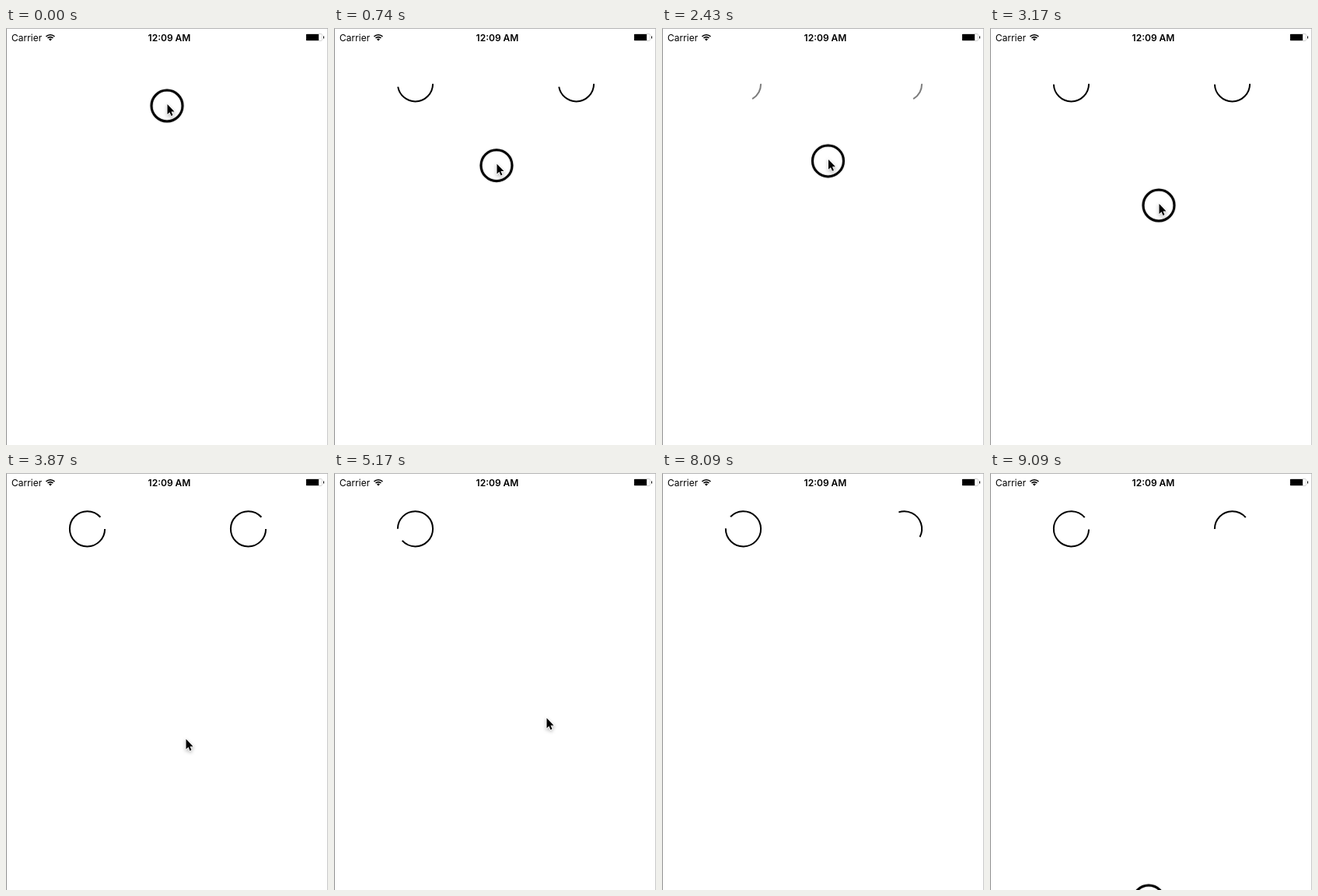
An HTML page with a canvas for the animation above (9140 ms loop, 414 by 536 pixels).

```html
<!DOCTYPE html>
<html lang="en">
<head>
<meta charset="utf-8">
<title>Pull to refresh</title>
<style>
html, body { margin: 0; width: 414px; height: 536px; overflow: hidden; background: #fff; }
body { position: relative; font: 12px/14px Inter, "Liberation Sans", sans-serif; color: #000; }
canvas { position: absolute; left: 0; top: 0; }
span { position: absolute; top: 6px; white-space: nowrap; }
.carrier { left: 7px; }
.clock { left: 109px; width: 202px; text-align: center; font-weight: 600; }
</style>
</head>
<body>
<canvas id="stage" width="414" height="536"></canvas>
<span class="carrier">Carrier</span>
<span class="clock">12:09 AM</span>
<script>
const ctx = document.getElementById('stage').getContext('2d');
const LOOP = 9140;
const RELEASE = 3868;   // second pull lets go, spinning starts
const SPIN = 0.1382;    // degrees per ms
const ARC = 318;        // length of the finished arc, degrees
const HALF = 164;       // where the right arc is split
const CYCLE = 1630;     // both halves of the right arc, ms

const pulls = [
  { down: 0, up: 1190, y: 100 },
  { down: 2060, up: RELEASE, y: 147 }
];

// the pointer glides to x, y between two times and rests in between
const glides = [
  { from: 0, to: 1120, x: 210, y: 214 },
  { from: 1560, to: 1840, x: 212, y: 145 },
  { from: 2120, to: 3170, x: 217, y: 226 },
  { from: 3170, to: 3800, x: 231, y: 342 },
  { from: 3920, to: 4600, x: 273, y: 315 },
  { from: 5200, to: 5560, x: 282, y: 307 },
  { from: 6900, to: 7480, x: 270, y: 332 },
  { from: 7480, to: 8030, x: 204, y: 562 },
  { from: 8800, to: 9000, x: 204, y: 548 }
];

const clamp = v => Math.max(0, Math.min(1, v));
const ramp = (t, a, b) => clamp((t - a) / (b - a));
const ease = (t, a, b) => { const u = ramp(t, a, b); return u * u * (3 - 2 * u); };

function pointer(t) {
  let x = 207, y = 98;
  for (const g of glides) {
    const u = ramp(t, g.from, g.to);
    x += (g.x - x) * u;
    y += (g.y - y) * u;
  }
  return { x, y };
}

const heldPull = t => pulls.find(p => t >= p.down && t < p.up);

// pulled distance to arc angle, with rubber-band resistance
function pullAngle(t) {
  const pull = heldPull(t);
  if (pull) {
    const d = Math.max(0, pointer(t).y + 2 - pull.y);
    return Math.min(ARC, 2.58 * d - 0.0047 * d * d);
  }
  const { up } = pulls[0];
  return pullAngle(up - 1) * (1 - ease(t, up, up + 560));
}

function arc(cx, from, to, alpha = 1) {
  if (to - from < 0.5) return;
  const rad = Math.PI / 180;
  ctx.globalAlpha = alpha;
  ctx.strokeStyle = '#000';
  ctx.lineWidth = 2;
  ctx.beginPath();
  ctx.arc(cx, 71.8, 22.6, from * rad, to * rad);
  ctx.stroke();
  ctx.globalAlpha = 1;
}

// start and end of the right arc while spinning: each half grows, then is eaten up
function chase(t) {
  if (t < RELEASE + 1240) return [ARC * ease(t, RELEASE + 380, RELEASE + 1210), ARC];
  const p = (t - RELEASE - 642) % CYCLE;
  if (p < CYCLE / 2) return [HALF * ease(p, 220, 600), HALF * ease(p, 0, 240)];
  const rest = ARC - HALF;
  return [HALF + rest * ease(p, 1250, CYCLE), HALF + rest * ease(p, 900, 1230)];
}

function spinners(t) {
  if (t < RELEASE) {
    const angle = pullAngle(t);
    for (const cx of [104.5, 311.5]) arc(cx, 0, angle, clamp(angle / 115));
    return;
  }
  const turn = (t - RELEASE) * SPIN;
  const [from, to] = chase(t);
  arc(104.5, turn, turn + ARC);
  arc(311.5, turn + from, turn + to);
}

function pressRing(x, y) {
  ctx.save();
  ctx.shadowColor = 'rgba(0,0,0,.35)';
  ctx.shadowBlur = 2;
  ctx.strokeStyle = '#000';
  ctx.lineWidth = 3;
  ctx.beginPath();
  ctx.arc(x, y + 2, 20, 0, 2 * Math.PI);
  ctx.stroke();
  ctx.restore();
}

function arrow(x, y) {
  const shape = new Path2D('M0 0V14L3.2 11.1L5.4 16.2L7.6 15.2L5.4 10.2H9.8Z');
  ctx.save();
  ctx.translate(x + 0.5, y);
  ctx.scale(0.92, 0.92);
  ctx.shadowColor = 'rgba(0,0,0,.35)';
  ctx.shadowBlur = 4;
  ctx.shadowOffsetY = 2;
  ctx.strokeStyle = '#fff';
  ctx.lineWidth = 1.6;
  ctx.stroke(shape);
  ctx.shadowColor = 'transparent';
  ctx.fillStyle = '#000';
  ctx.fill(shape);
  ctx.restore();
}

function rect(color, x, y, w, h) {
  ctx.fillStyle = color;
  ctx.fillRect(x, y, w, h);
}

function chrome() {
  rect('#fff', 0, 0, 414, 536);
  rect('#b4b4b4', 0, 0, 414, 1);
  rect('#909090', 0, 1, 1, 535);
  rect('#c8c8c8', 413, 1, 1, 535);

  // wifi
  const a = -Math.PI * 0.75, b = -Math.PI * 0.25;
  ctx.fillStyle = ctx.strokeStyle = '#000';
  ctx.lineWidth = 1.6;
  for (const r of [4.9, 7.8]) {
    ctx.beginPath();
    ctx.arc(57, 16.5, r, a, b);
    ctx.stroke();
  }
  ctx.beginPath();
  ctx.moveTo(57, 16.5);
  ctx.arc(57, 16.5, 2.8, a, b);
  ctx.fill();

  // battery
  ctx.strokeStyle = '#aaa';
  ctx.lineWidth = 0.5;
  ctx.beginPath();
  ctx.roundRect(385.8, 7.5, 20.6, 9, 1.5);
  ctx.stroke();
  rect('#000', 386, 8, 16, 8);
  rect('#000', 408, 10.5, 1, 3);
}

function draw(now) {
  const t = now % LOOP;
  const { x, y } = pointer(t);
  chrome();
  spinners(t);
  if (heldPull(t) || t >= 9000) pressRing(x, y);
  arrow(x, y);
}

let begin = null;
function tick(now) {
  if (begin === null) begin = now;
  draw(now - begin);
  requestAnimationFrame(tick);
}
draw(0);
requestAnimationFrame(tick);
</script>
</body>
</html>
```
